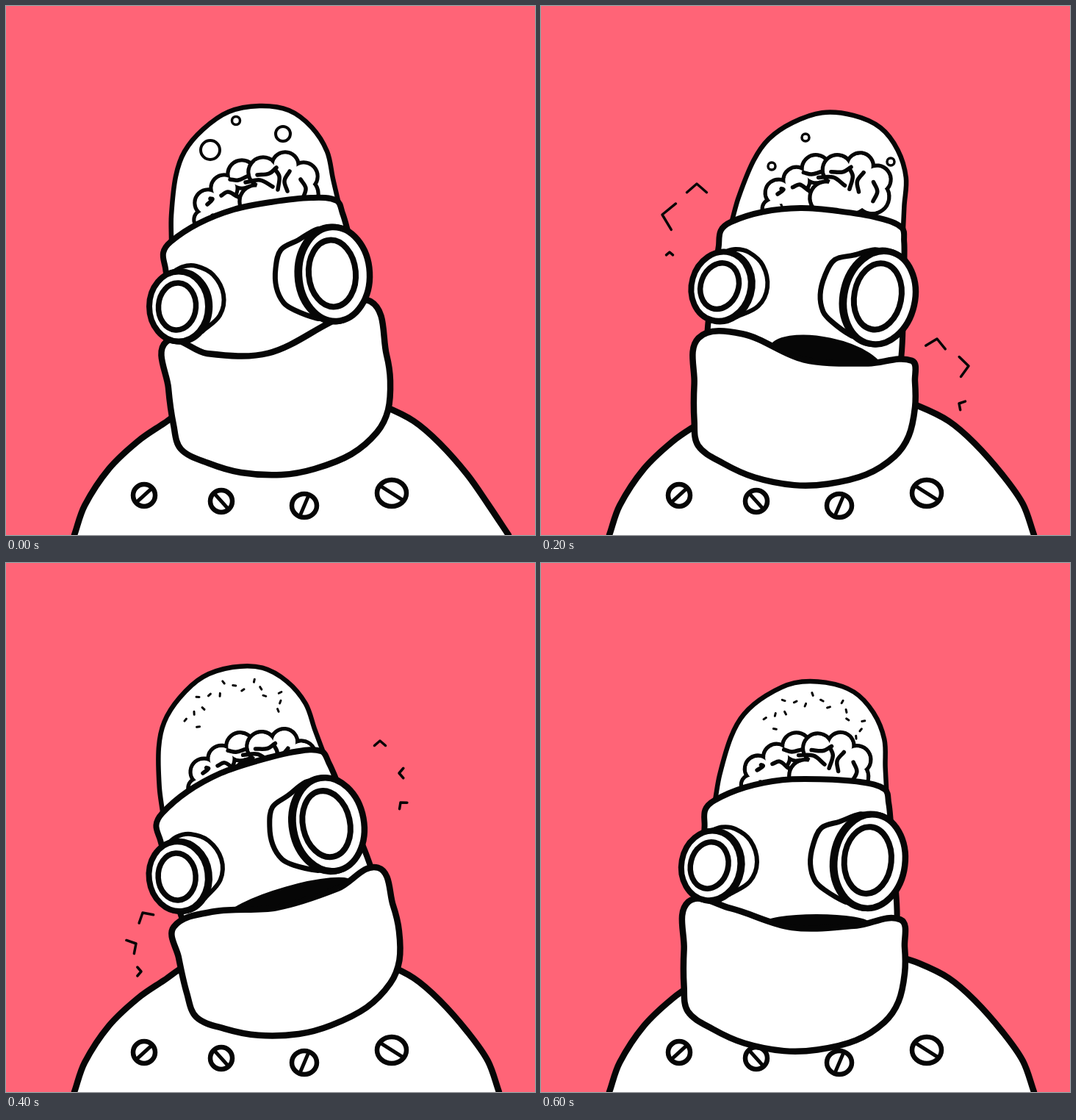
An HTML page with a canvas for the animation above (700 ms loop, 720 by 720 pixels).

```html
<!DOCTYPE html>
<html lang="en">
<head>
<meta charset="utf-8">
<title>Shaking robot</title>
<style>
html, body { margin: 0; width: 100%; height: 100%; overflow: hidden; background: #ff6477; }
canvas { display: block; width: 720px; height: 720px; }
</style>
</head>
<body>
<canvas id="stage" width="720" height="720"></canvas>
<script>
const ctx = document.getElementById('stage').getContext('2d');
const INK = '#060606', PAPER = '#fff', BACK = '#ff6477';
const STEP = 100;
const rad = deg => deg * Math.PI / 180;
const points = s => s.split(' ').map(p => p.split(',').map(Number));

// Smooth curve through points; handles scale with each segment, so corners stay tight.
function curve(p, closed) {
  const n = p.length, path = new Path2D();
  const at = i => closed ? p[(i + n) % n] : p[Math.max(0, Math.min(n - 1, i))];
  const dir = i => {
    const a = at(i - 1), b = at(i + 1), d = Math.hypot(b[0] - a[0], b[1] - a[1]) || 1;
    return [(b[0] - a[0]) / d, (b[1] - a[1]) / d];
  };
  path.moveTo(...p[0]);
  for (let i = 0; i < (closed ? n : n - 1); i++) {
    const a = at(i), b = at(i + 1), u = dir(i), v = dir(i + 1);
    const h = Math.hypot(b[0] - a[0], b[1] - a[1]) / 3;
    path.bezierCurveTo(a[0] + u[0] * h, a[1] + u[1] * h, b[0] - v[0] * h, b[1] - v[1] * h, ...b);
  }
  if (closed) path.closePath();
  return path;
}

function ink(path, width, fill) {
  if (fill) { ctx.fillStyle = fill; ctx.fill(path); }
  ctx.lineWidth = width;
  ctx.stroke(path);
}

function line(p, width) {
  ink(new Path2D('M' + p.map(q => q.join(' ')).join('L')), width);
}

function oval(x, y, rx, ry, width, fill, tilt = 0) {
  const path = new Path2D();
  path.ellipse(x, y, rx, ry, rad(tilt), 0, Math.PI * 2);
  ink(path, width, fill);
}

function placed([x, y, angle], draw) {
  ctx.save();
  ctx.translate(x, y);
  ctx.rotate(rad(angle));
  draw();
  ctx.restore();
}

// Fixed parts; head and jaw shapes are relative to their own pivots
const SHOULDERS = points('93,720 107,680 140,630 180,592 215,568 245,548 360,500 480,534 515,545 555,565 590,595 628,638 656,678');
const DOME = points('-115,10 -115,-25 -109,-78 -97,-112 -72,-142 -37,-166 5,-174 45,-168 76,-145 97,-112 105,-75 112,-45');
const FACE = points('-97,203 -109,148 -123,47 -126,26 -116,11 -78,-14 -30,-33 20,-43 75,-49 110,-45 118,-28 124,-8 151,96 158,130 160,165');
const CHIN = points('150,-75 155,-40 152,0 137,30 102,60 52,80 7,88 -48,85 -93,72 -130,53 -140,20 -147,-30');
const SCREWS = points('188,666,15,15,-42 293,674,15,15,48 406,680,17,16,-67 525,663,20,18,32');
const BACK_LOBES = points('270,291,14 275,268,18 297,248,18 321,229,19 340,233,18 300,275,22');
const FRONT_LOBES = points('340,266,22 350,226,20 380,217,18 405,232,19 402,256,23 370,252,32');
const FOLDS = ['278,262 281,263 274,270', '293,258 302,253 314,259', '305,236 316,237 328,232', '326,240 346,237 363,246',
  '342,230 358,228 368,220', '366,222 372,232 370,250', '386,225 379,238 383,252', '401,236 408,248 404,262'];

function body(spread) {
  ink(curve([...SHOULDERS, [671 + spread, 720]]), 8.5, PAPER);
  for (const [x, y, rx, ry, angle] of SCREWS) {
    oval(x, y, rx, ry, 6.5, PAPER);
    placed([x, y, angle], () => line([[3 - rx, 0], [rx - 3, 0]], 5));
  }
}

// Overlapping circles merged into one outline
function cloud(lobes) {
  for (const [x, y, r] of lobes) oval(x, y, r, r, 5.5);
  ctx.fillStyle = PAPER;
  for (const [x, y, r] of lobes) {
    ctx.beginPath();
    ctx.arc(x, y, r - 2.5, 0, Math.PI * 2);
    ctx.fill();
  }
}

function brain() {
  ctx.translate(-380, -199);
  cloud(BACK_LOBES);
  cloud(FRONT_LOBES);
  FOLDS.forEach(s => ink(curve(points(s)), 5.5));
}

// Short dashes scattered along an arch under the glass
function dust() {
  for (let i = 0; i < 16; i++) {
    const a = rad(-178 + 11 * i), r = [0.85, 1.12, 0.98][i % 3];
    placed([4 + Math.cos(a) * 66 * r, -98 + Math.sin(a) * 52 * r, i * 137], () => line([[-2, 0], [2, 0]], 3));
  }
}

function head({ head: at, slosh: [dx, dy, turn] = [0, 0, 0], bubbles }) {
  const glass = curve(DOME);
  placed(at, () => {
    ctx.fillStyle = PAPER;
    ctx.fill(glass);
    ctx.save();
    ctx.clip(glass);
    placed([0, 0, -at[2]], () => {
      const c = Math.cos(rad(at[2])), s = Math.sin(rad(at[2]));
      placed([40 * c + 111 * s + dx, 40 * s - 111 * c + dy, at[2] + turn], brain);
      ctx.translate(-at[0], -at[1]);
      if (bubbles) bubbles.forEach(([x, y, r]) => oval(x, y, r, r, r > 9 ? 4 : 3.5, PAPER));
    });
    if (!bubbles) dust();
    ctx.restore();
    ink(glass, 6.5);
    ink(curve(FACE), 8, PAPER);
  });
}

// The lip sags from the line between the two upper corners.
function jaw({ jaw: at, corners: [left, right], lip }) {
  const rx = 138 + (right + 115) * 0.3;
  const sag = lip.map((d, i) => {
    const t = 0.2 + 0.3 * i;
    return [-150 + (rx + 150) * t, left + (right - left) * t + d];
  });
  placed(at, () => ink(curve([[-150, left], ...sag, [rx, right], ...CHIN], true), 8.5, PAPER));
}

function eyes() {
  placed([-105, 99, 0], () => {
    ink(curve(points('-12,-44 5,-54 24,-55 47,-43 61,-16 56,12 32,34')), 6, PAPER);
    oval(2, 0, 40, 47.5, 8.5, INK);
    oval(0, 0, 40, 47.5, 8, PAPER);
    oval(-2, 0, 25.5, 32, 7.5, PAPER, 4);
  });
  placed([107, 55, 0], () => {
    ink(curve(points('-10,-61 -24,-61 -50,-46 -73,-33 -80,-8 -79,18 -69,39 -54,49 -24,60 -10,60')), 7, PAPER);
    oval(-2, 0, 48, 64, 9, INK, -3);
    oval(0, 0, 48, 64, 8.5, PAPER, -3);
    oval(-3, -1, 32, 45.5, 8, PAPER, -5);
  });
}

// Shake marks: a bowed zigzag, or a small chevron
function zigzag([x1, y1, x2, y2, bow]) {
  const dx = x2 - x1, dy = y2 - y1, len = Math.hypot(dx, dy), p = [];
  for (let i = 0; i <= 6; i++) {
    const t = i / 6, out = bow * Math.sin(Math.PI * t) + (i % 2 ? 6 : -6);
    p.push([x1 + dx * t - dy / len * out, y1 + dy * t + dx / len * out]);
  }
  line(p, 3.5);
}
function chevron([x, y, angle, size]) {
  placed([x, y, angle], () => line([[-size * 0.75, size * 0.65], [0, 0], [size * 0.75, size * 0.65]], 3.5));
}

const rest = {
  head: [340, 310, 0], jaw: [368, 550, 0], corners: [-93, -148], lip: [27, 43, 18], spread: 13,
  bubbles: points('278,196,13 377,174,10 313,156,5.5')
};
const rattle = {
  head: [351, 303, 5.6], jaw: [356, 544, 5], corners: [-93, -111], lip: [6, 21, 11], spread: 13,
  mouth: [388, 458, 72, 15, -3],
  zigzags: points('220,272,199,332,20 524,496,548,543,-22')
};
const gape = {
  head: [373, 315, 15.8], jaw: [350, 564, 8], corners: [-92, -102], lip: [-12, 14, 10],
  slosh: [-5, -19, -8], mouth: [388, 482, 78, 30, 12],
  bubbles: points('360,179,5 314,218,5 476,212,5'),
  chevrons: points('212,242,0,18 165,284,-80,24 175,335,0,6 539,453,10,18 582,490,85,18 569,541,-60,9')
};
const yell = {
  head: [362, 321, 7.2], jaw: [392, 580, 0], corners: [-56, -121], lip: [-12, 12, 13],
  slosh: [-30, -12, -7], mouth: [383, 495, 108, 40, -6],
  bubbles: points('334,167,13 440,181,8 290,210,6'),
  zigzags: points('520,271,504,333,-8 215,489,206,554,16')
};
const tilt = {
  head: [326, 315, -7.4], jaw: [384, 554, -5], corners: [-72, -128], lip: [-5, 14, 12],
  slosh: [29, 26, 13], mouth: [385, 458, 88, 17, -16],
  chevrons: points('509,242,0,10 535,286,-90,9 537,326,-40,9 186,476,-30,15 177,518,60,14 184,556,90,8')
};
const shut = {
  head: [307, 315.5, 0], jaw: [335, 556, 0], corners: [-88, -128], lip: [0, 0, 0],
  bubbles: points('283,178,15 363,188,6 243,219,7')
};
const drop = {
  head: [352, 333, 10.2], jaw: [336, 576, 8], corners: [-95, -111], lip: [4, 23, 13],
  mouth: [375, 491, 72, 12, 0]
};
const poses = [rest, rattle, gape, yell, tilt, shut, drop];

function draw(pose) {
  body(pose.spread || 0);
  head(pose);
  if (pose.mouth) {
    const [x, y, rx, ry, angle] = pose.mouth;
    oval(x, y, rx, ry, 2, INK, angle);
  }
  jaw(pose);
  placed(pose.head, eyes);
  (pose.zigzags || []).forEach(zigzag);
  (pose.chevrons || []).forEach(chevron);
}

const start = performance.now();

function render() {
  const t = Math.max(0, performance.now() - start);
  ctx.fillStyle = BACK;
  ctx.fillRect(0, 0, 720, 720);
  ctx.strokeStyle = INK;
  ctx.lineCap = ctx.lineJoin = 'round';
  draw(poses[Math.floor(t / STEP) % poses.length]);
  requestAnimationFrame(render);
}
render();
</script>
</body>
</html>
```
